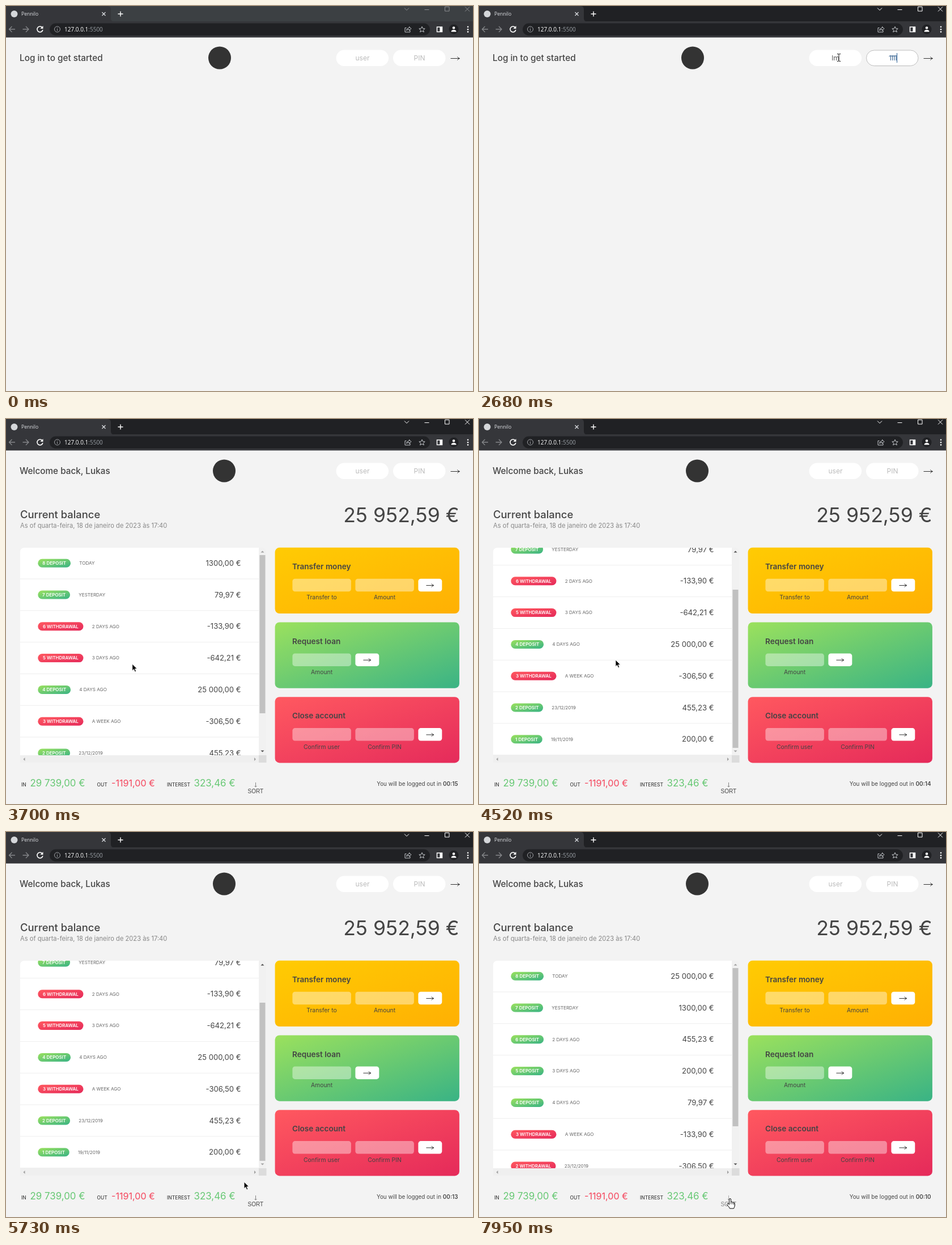
An HTML page for the animation above (8 s loop, 824 by 679 pixels).

```html
<!DOCTYPE html>
<html lang="en">
<head>
<meta charset="utf-8">
<title>Pennilo</title>
<style>
  html, body { margin: 0; width: 100%; height: 100%; overflow: hidden; background: #f3f3f3; }
  svg { display: block; width: 824px; height: 679px; }
  text { font-family: Inter, "Open Sans", sans-serif; fill: #444; white-space: pre; }
  .ui { font-family: "Open Sans", "Noto Sans", sans-serif; }
  .arial { font-family: "Liberation Sans", Arial, sans-serif; }
</style>
</head>
<body>
<script>
const LOOP = 8000;

// ---- markup helpers ----
const attrs = o => Object.entries(o).map(([k, v]) => ` ${k}="${v}"`).join('');
const text = (x, y, size, str, o = {}) =>
  `<text x="${x}" y="${y}" font-size="${size}"${attrs(o)}>${str}</text>`;
const mid = (x, y, size, str, o = {}) => text(x, y, size, str, { 'text-anchor': 'middle', ...o });
const end = (x, y, size, str, o = {}) => text(x, y, size, str, { 'text-anchor': 'end', ...o });
const rect = (x, y, width, height, fill, rx = 0, o = {}) =>
  `<rect${attrs({ x, y, width, height, fill, rx, ...o })}/>`;
const circle = (cx, cy, r, fill, o = {}) => `<circle${attrs({ cx, cy, r, fill, ...o })}/>`;
const line = (d, stroke, w = 1, o = {}) =>
  `<path${attrs({ d, stroke, 'stroke-width': w, fill: 'none', ...o })}/>`;
const shape = (d, fill, o = {}) => `<path${attrs({ d, fill, ...o })}/>`;
const group = (id, body, o = {}) => `<g id="${id}"${attrs(o)}>${body}</g>`;
const arrow = (x, y, w, color = '#333') =>
  line(`M${x} ${y}h${w}m-4 -3q1 2.2 4 3q-3 .8 -4 3`, color);
const grad = (id, from, to) =>
  `<linearGradient id="${id}" x1="0" y1="0" x2="1" y2="1">` +
  `<stop stop-color="${from}"/><stop offset="1" stop-color="${to}"/></linearGradient>`;

// ---- browser window ----
function browser() {
  const dim = '#85878a', lit = '#dfe1e5';
  return rect(0, 0, 824, 28, '#202124', 0, { id: 'strip' }) +
    shape('M0 28V0H179Q185 0 185 6V22Q185 27 191 28Z', '#35363a') +
    rect(0, 27, 824, 28.5, '#35363a') +
    circle(14.5, 14, 6, '#d5d7da') +
    text(27, 17, 8.6, 'Pennilo', { class: 'ui', style: 'fill:#dfe1e5' }) +
    line('M169.500 11l6 6m0 -6l-6 6', lit, 1.2) +
    line('M197.500 14h9m-4.500 -4.500v9', '#fff', 1.4) +
    group('controls',
      line('M703 3.500l4 4l4 -4M738.500 6.500h8M774.500 1.500h7.500v7.500h-7.500zM810 1.500l8 8m0 -8l-8 8', 'currentColor')) +
    line('M16 41H5.500m5 -5l-5 5l5 5M29.500 41H40m-5 -5l5 5l-5 5', dim, 1.3) +
    line('M64 38a5 5 0 1 0 .9 4', '#fff', 1.6) + shape('M65.500 35v5h-5z', '#fff') +
    rect(77, 30.5, 671, 21.5, '#202124', 10.75) +
    circle(90.5, 41, 5, 'none', { stroke: '#a0a3a7' }) +
    line('M90.500 40.500v3.200m0 -5.500v1.100', '#a0a3a7', 1.1) +
    text(103, 45, 10, '127.0.0.1<tspan fill="#9aa0a6">:5500</tspan>', { class: 'ui', style: 'fill:#fff' }) +
    line('M706.500 38.500h-2.500v7.500h9v-3M706.500 43q.5 -4 5 -4.500v-2l3.500 3.500l-3.500 3.300v-2q-3 0 -5 1.700z', '#c4c7cb') +
    line('M734 36.300l1.500 3.400l3.700 .3l-2.800 2.400l.9 3.600l-3.300 -2l-3.300 2l.9 -3.600l-2.800 -2.400l3.700 -.3z', '#c4c7cb') +
    line('M760.500 37h9v8.500h-9z', '#fff', 1.5) + rect(765.5, 37, 4, 8.5, '#fff') +
    circle(790, 41, 8.5, '#202124') + circle(790, 38.5, 2.3, '#fff') +
    shape('M785.500 45.500q0 -3.500 4.500 -3.500t4.500 3.500z', '#fff') +
    [36.8, 41.2, 45.6].map(y => circle(815, y, 1.3, '#fff')).join('');
}

// ---- top bar ----
const field = (x, id) => rect(x, 77.5, 92.5, 28.5, '#fff', 14.25) +
  rect(x + .5, 78, 91.5, 27.5, 'none', 13.75, { id: id + 'Ring', stroke: '#bbb' }) +
  mid(x + 46.5, 95.5, 12, '', { id });

function topBar() {
  return text(24, 97, 15.3, '', { id: 'hello', 'font-weight': 500 }) +
    circle(377, 91.5, 20, '#333', { id: 'logo' }) +
    field(582.5, 'user') + field(683, 'pin') +
    line('M0 83v17', '#2b5f95', 1, { id: 'caret' }) +
    arrow(784.5, 92.5, 16);
}

// ---- account list ----
const MOVES = [200, 455.23, -306.5, 25000, -642.21, -133.9, 79.97, 1300];
const DATES = ['19/11/2019', '23/12/2019', 'A WEEK AGO', '4 DAYS AGO', '3 DAYS AGO', '2 DAYS AGO', 'YESTERDAY', 'TODAY'];
const STEP = 55.8;

const money = n => n.toFixed(2).replace('.', ',').replace(/(\d\d)(\d{3},)/, '$1 $2') + ' €';

function row(amount, i) {
  const n = i + 1, y = 254 + STEP * (7 - i), out = amount < 0;
  const w = ({ 1: 55.5, 2: 56.8, 7: 56.8 }[n] || 57.8) + (out ? 22.4 : 0);
  return rect(56.3, y - 7.3, w, 15, out ? 'url(#red)' : 'url(#green)', 7.5) +
    mid(56.3 + w / 2, y + 3, 8, `${n} ${out ? 'WITHDRAWAL' : 'DEPOSIT'}`, { 'font-weight': 600, style: 'fill:#fff' }) +
    text(56.5 + w + 15, y + 3, 8.1, DATES[i], { style: 'fill:#666' }) +
    end(414.5, y + 4.7, 13.1, money(amount)) +
    rect(25, y + 27.5, 421, 1, '#eee');
}

function list() {
  const sorted = [...MOVES].sort((a, b) => a - b);
  return `<clipPath id="view"><path d="M25 593V235q0 -8 8 -8H446V593z"/></clipPath>` +
    `<g clip-path="url(#view)">` + rect(25, 227, 421, 366, '#fff') +
    group('rows', group('byDate', MOVES.map(row).join('')) + group('bySize', sorted.map(row).join(''))) + '</g>' +
    shape('M446 227h6q7 0 7 7V593h-13z', '#f1f1f1') +
    rect(25, 593, 421, 13, '#efefef') + rect(446, 593, 13.5, 13, '#dcdcdc') +
    rect(447.5, 240, 10, 279, '#c1c1c1', 0, { id: 'thumb' }) +
    shape('M449.500 235.500h6l-3 -3z', '#505050', { id: 'up' }) +
    shape('M449.500 584.500h6l-3 3z', '#505050', { id: 'down' }) +
    shape('M33.500 597v6l-3 -3zM438 597v6l3 -3z', '#a0a0a0');
}

// ---- action cards ----
function card(i, title, fill, labels) {
  const y = 226.8 + 131.7 * i;
  const inputs = labels.map((label, k) =>
    rect(505.4 + 111 * k, y + 54.9, 103.5, 22.5, '#fff', 4.5, { 'fill-opacity': .4 }) +
    mid(557 + 111 * k, y + 91.5, 10.4, label)).join('');
  const x = 505.4 + 111 * labels.length;
  return rect(474.6, y, 325.3, 116.2, `url(#${fill})`, 8) +
    text(505, y + 38, 13.6, title, { 'font-weight': 600 }) + inputs +
    rect(x, y + 54.9, 41.9, 22.5, '#fff', 4.5) + arrow(x + 14, y + 66.7, 13.5);
}

function summary() {
  const item = (x, label, x2, size, value, fill) =>
    text(x, 648, 8.5, label, { 'font-weight': 500 }) +
    text(x2, 648, size, value, { style: 'fill:' + fill });
  return item(27, 'IN', 42.5, 16.9, '29 739,00 €', '#66c873') +
    item(160.5, 'OUT', 186, 16.1, '-1191,00 €', '#f5465d') +
    item(284, 'INTEREST', 331.5, 16.9, '323,46 €', '#66c873') +
    group('sort', line('M440.500 641v8m-2 -2l2 2l2 -2', '#666', .8) +
      mid(440.3, 660, 10, 'SORT', { class: 'arial' })) +
    end(797.5, 646.5, 9.9, 'You will be logged out in <tspan font-weight="600" id="timer"></tspan>');
}

function app() {
  return text(25, 174.5, 18.4, 'Current balance', { 'font-weight': 500 }) +
    text(25, 191.5, 11.15, 'As of quarta-feira, 18 de janeiro de 2023 às 17:40', { style: 'fill:#888' }) +
    end(799.5, 181.5, 35.6, '25 952,59 €') + list() +
    card(0, 'Transfer money', 'gold', ['Transfer to', 'Amount']) +
    card(1, 'Request loan', 'green', ['Amount']) +
    card(2, 'Close account', 'red', ['Confirm user', 'Confirm PIN']) + summary();
}

// ---- pointers, hot spot at 0,0 ----
const pointers =
  group('arrowPtr', shape('M0 0V11.500L2.700 9L4.700 13.600L6.600 12.800L4.700 8.300H8.300Z', '#000', { stroke: '#fff', 'stroke-width': .7 })) +
  group('beamPtr', line('M-3 -6.500h2.200l.8 .8l.8 -.8h2.200M0 -6v12M-3 6.500h2.200l.8 -.8l.8 .8h2.200', '#111')) +
  group('handPtr', shape('M-1.500 9V1Q-1.500 -.5 0 -.5T1.500 1V5.500Q3.500 4.500 4.200 6Q6 5.500 6.500 7Q8.200 7 8.200 9V12Q8 14 6.500 17H-.5Q-2 13.500 -4.800 11Q-6 9.500 -4.800 8.500Q-3.500 7.700 -1.500 10Z', '#fff', { stroke: '#000' }) +
    line('M1.500 5.500v4M4.200 6.500v3M6.500 7.500v2.500', '#000', .8));

document.body.innerHTML = `<svg viewBox="0 0 824 679"><defs>` +
  grad('gold', '#ffcb03', '#ffb003') + grad('green', '#9be15d', '#39b385') + grad('red', '#ff585f', '#e52a5a') +
  '</defs>' + rect(0, 55, 824, 624, '#f3f3f3') + browser() + topBar() + group('app', app()) + pointers + '</svg>';

const $ = id => document.getElementById(id);

// ---- timeline ----
const ACTIVE = 690, LOGIN = 2880, SORTED = 6100;
const USER_KEYS = [1190, 1290], PIN_KEYS = [2190, 2290, 2480, 2680];
const SCROLL = [[4380, 0], [4500, 80], [4680, 80], [4900, 0], [5100, 0], [5300, 80], [6820, 80], [7100, 0]];
const PATH = [
  [0, 0, 0, ''], [100, 708, 599, 'arrow'], [190, 652, 515, 'arrow'], [390, 652, 515, 'arrow'],
  [500, 643, 330, 'arrow'], [600, 637, 180, 'arrow'], [690, 635, 91, 'beam'], [3200, 635, 91, 'beam'],
  [3300, 560, 180, 'arrow'], [3500, 330, 370, 'arrow'], [3700, 223, 432, 'arrow'], [3850, 204, 478, 'arrow'],
  [4050, 238, 412, 'arrow'], [4210, 241, 425, 'arrow'], [5320, 241, 425, 'arrow'], [5530, 340, 535, 'arrow'],
  [5730, 420, 617, 'arrow'], [5830, 434, 638, 'arrow'], [5930, 442, 647, 'hand'], [6380, 442, 647, 'hand'],
  [6480, 430, 590, 'arrow'], [6750, 378, 340, 'arrow'], [7250, 375, 335, 'arrow'], [7350, 379, 350, 'arrow'],
  [7450, 0, 0, ''], [7750, 446, 632, 'arrow'], [7850, 443, 647, 'hand'], [8000, 443, 647, 'hand'],
];

const lerp = (a, b, p) => a + (b - a) * p;

function span(table, t) {
  const i = table.findLastIndex(k => k[0] <= t);
  if (i < 0) return [table[0], table[0], 0];
  const a = table[i], b = table[i + 1] || a;
  return [a, b, b === a ? 0 : (t - a[0]) / (b[0] - a[0])];
}

const show = (id, on) => $(id).style.display = on ? '' : 'none';
const typed = (keys, t) => keys.filter(k => k <= t).length;

const fade = $('app').animate([{ opacity: 0 }, { opacity: 1 }], { duration: 1000, easing: 'ease', fill: 'both' });
fade.pause();

function fill(id, value, hint, color, spacing = 0) {
  const el = $(id);
  el.textContent = value || hint;
  el.style.fill = value ? color : '#bbb';
  el.style.letterSpacing = value ? spacing + 'px' : 0;
}

function drawLogin(t) {
  const inside = t >= LOGIN;
  const nUser = inside ? 0 : typed(USER_KEYS, t), nPin = inside ? 0 : typed(PIN_KEYS, t);
  fill('user', 'lm'.slice(0, nUser), 'user', '#555');
  fill('pin', '1111'.slice(0, nPin), 'PIN', '#35618f', -1.6);
  const onUser = t >= 990 && t < 1690, onPin = t >= 1690 && !inside;
  $('userRing').style.opacity = onUser ? Math.min(1, (t - 890) / 200) : 0;
  $('pinRing').style.opacity = onPin ? Math.min(1, (t - 1590) / 300) : 0;
  show('caret', onUser || onPin);
  const x = onUser ? 629.5 + [0, 2, 7][nUser] : 729.5 + 2.1 * nPin;
  $('caret').setAttribute('transform', `translate(${Math.floor(x) + .5} 0)`);
  $('hello').textContent = inside ? 'Welcome back, Lukas' : 'Log in to get started';
  $('logo').setAttribute('cx', inside ? 385 : 377);
}

function drawApp(t) {
  show('app', t >= LOGIN);
  fade.currentTime = Math.max(0, Math.min(1000, t - 2790));
  const [a, b, p] = span(SCROLL, t), y = lerp(a[1], b[1], p);
  $('rows').setAttribute('transform', `translate(0 ${-y})`);
  $('thumb').setAttribute('y', 240 + y * 61 / 80);
  $('up').setAttribute('fill', y > 0 ? '#505050' : '#a0a0a0');
  $('down').setAttribute('fill', y < 80 ? '#505050' : '#a0a0a0');
  show('byDate', t < SORTED);
  show('bySize', t >= SORTED);
  $('sort').style.opacity = t >= 7850 ? .65 : 1;
  const left = Math.min(15, 15 - Math.floor((t - 2830) / 1000));
  $('timer').textContent = '00:' + left;
}

function drawPointer(t) {
  const [a, b, p] = span(PATH, t), k = b[3] ? p : 0;
  for (const kind of ['arrow', 'beam', 'hand']) {
    show(kind + 'Ptr', kind === a[3]);
    $(kind + 'Ptr').setAttribute('transform', `translate(${lerp(a[1], b[1], k)} ${lerp(a[2], b[2], k)})`);
  }
}

function draw(t) {
  $('strip').setAttribute('fill', t < ACTIVE ? '#3c4043' : '#202124');
  $('controls').style.color = t < ACTIVE ? '#8b8d90' : '#fff';
  drawLogin(t);
  drawApp(t);
  drawPointer(t);
}

const start = performance.now();
function tick(now) {
  draw(Math.max(0, now - start) % LOOP);
  requestAnimationFrame(tick);
}
draw(0);
requestAnimationFrame(tick);
</script>
</body>
</html>
```
